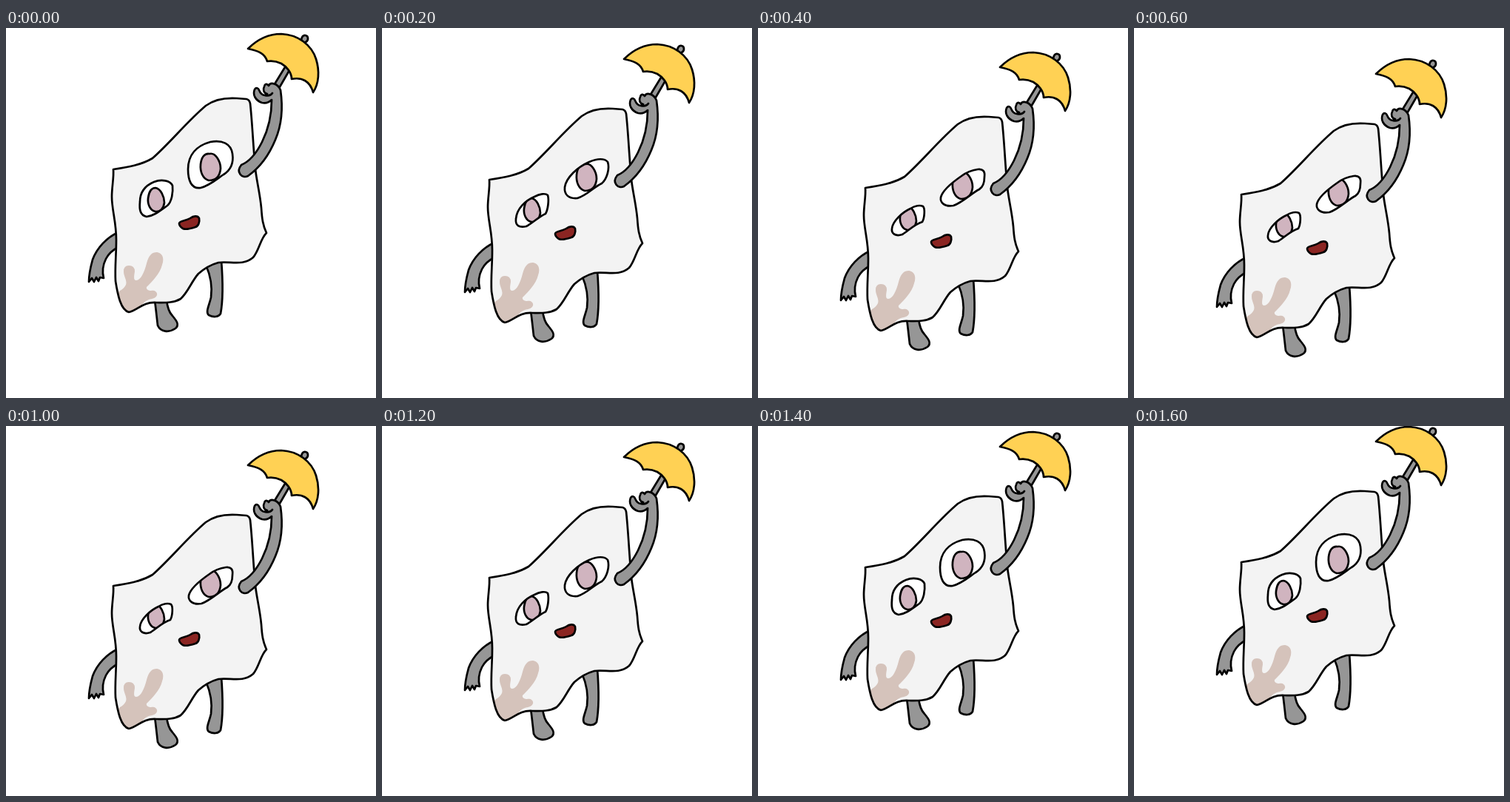
Recreate the animation shown at these times as an HTML page. Size 500 px wide and 500 px high, loop 2 s.

```html
<!DOCTYPE html>
<html lang="en">
<head>
<meta charset="utf-8">
<title>Floating paper with umbrella</title>
<style>
  html, body { margin: 0; width: 100%; height: 100%; overflow: hidden; background: #fff; }
  svg { display: block; width: 100vw; height: 100vh; }
  .line { stroke: #000; stroke-width: 2.7; stroke-linejoin: round; stroke-linecap: round; }
  .limb { fill: #969696; }
  .paper { fill: #f3f3f3; }
  .white { fill: #fff; }
  .pupil { fill: #d0b4bf; }
  .none { fill: none; }

  /* Every pose is held, then switched hard */
  .float, .eyes { animation: 2s step-end infinite; }
  .float { animation-name: float; }
  .open { animation-name: open; }
  .half { animation-name: half; }
  .narrow { animation-name: narrow; }

  @keyframes float {
    0%, 70% { transform: translateY(0); }
    10%, 60% { transform: translateY(14px); }
    20%, 50% { transform: translateY(25px); }
    30% { transform: translateY(34px); }
    80%, 100% { transform: translateY(-7px); }
  }
  @keyframes open {
    0%, 70%, 100% { visibility: visible; }
    10% { visibility: hidden; }
  }
  @keyframes half {
    0%, 20%, 70%, 100% { visibility: hidden; }
    10%, 60% { visibility: visible; }
  }
  @keyframes narrow {
    0%, 60%, 100% { visibility: hidden; }
    20% { visibility: visible; }
  }
</style>
</head>
<body>
<svg viewBox="0 0 500 500">
  <defs>
    <path id="sheet" d="M145 191C165 188 183 185 198 176C222 155 244 127 270 105C282 96 296 94 312 95L325 96Q329 97 330 102C333 130 334 160 337 191C339 208 343 223 345 243C346 258 347 266 352 277C344 284 342 301 334 310C320 322 304 315 287 317C276 320 268 325 260 332C251 342 246 357 236 366C226 372 214 371 203 371C184 370 179 381 166 384C155 381 151 361 148 342C147 322 149 308 149 286C149 262 143 246 143 228C143 215 146 201 145 191Z"/>
    <path id="openR" d="M246 191C246 171 258 159 276 154C292 151 304 156 306 170C308 184 302 193 294 198C285 204 275 213 263 216C250 218 246 205 246 191Z"/>
    <path id="openL" d="M181 235C181 222 188 213 200 208C210 204 222 206 225 213C226 222 224 235 218 240C208 247 200 254 190 255C181 253 180 245 181 235Z"/>
    <path id="halfR" d="M247 201C249 188 264 174 280 167C291 162 301 162 305 167C308 176 304 190 297 196C286 201 277 212 264 216C252 217 246 211 247 201Z"/>
    <path id="halfL" d="M181 244C182 230 194 219 206 214C213 210 221 209 224 212C226 219 224 232 221 237C212 241 203 250 195 254C185 256 180 253 181 244Z"/>
    <path id="narrowR" d="M247 204C249 195 262 184 275 175C283 169 290 167 297 166C304 165 307 169 306 176C306 183 304 190 299 193C289 198 276 211 264 215C252 217 246 211 247 204Z"/>
    <path id="narrowL" d="M181 246C182 236 195 224 206 219C212 215 219 214 223 216C226 219 225 232 222 237C212 240 203 249 195 254C186 257 180 253 181 246Z"/>
    <g id="pupils" class="pupil line">
      <path d="M275 170C283 168 290 180 290 190C289 201 283 206 274 206C266 204 262 194 263 184C264 175 268 169 275 170Z"/>
      <path d="M202 216C209 217 214 228 214 236C213 244 208 249 202 248C195 247 191 238 192 230C193 222 196 216 202 216Z"/>
    </g>
    <clipPath id="inSheet"><use href="#sheet"/></clipPath>
    <clipPath id="inOpen"><use href="#openR"/><use href="#openL"/></clipPath>
    <clipPath id="inHalf"><use href="#halfR"/><use href="#halfL"/></clipPath>
    <clipPath id="inNarrow"><use href="#narrowR"/><use href="#narrowL"/></clipPath>
  </defs>

  <g class="float">
    <!-- far arm and legs -->
    <g class="limb line">
      <path d="M152 276C136 283 123 297 117 313C114 324 112 334 112 343L116 338L119 343L122 337L125 342L127 337L132 338C130 330 131 320 135 312C139 304 144 300 152 296Z"/>
      <path d="M201 368C203 383 204 394 205 402C209 411 220 412 229 406C235 401 230 395 225 389C220 384 218 377 217 367Z"/>
      <path d="M270 320C277 336 279 350 277 364C275 374 269 384 274 388C280 391 287 391 290 386C293 370 293 340 291 314Z"/>
    </g>

    <use href="#sheet" class="paper"/>
    <path clip-path="url(#inSheet)" fill="#d5c3bb" d="M145 362C152 355 159 354 162 347C164 341 159 336 159 329Q159 321 166 321Q174 321 174 329C173 336 172 341 176 341C182 341 187 330 190 318C193 307 197 303 204 303C212 304 214 312 211 320C208 332 198 342 190 350C189 353 193 355 196 355C201 354 205 357 204 361C203 365 197 366 193 367C187 369 184 374 181 378L167 390L145 385Z"/>
    <use href="#sheet" class="none line"/>

    <g class="eyes open">
      <g class="white"><use href="#openR"/><use href="#openL"/></g>
      <use href="#pupils" clip-path="url(#inOpen)"/>
      <g class="none line"><use href="#openR"/><use href="#openL"/></g>
    </g>
    <g class="eyes half">
      <g class="white"><use href="#halfR"/><use href="#halfL"/></g>
      <use href="#pupils" clip-path="url(#inHalf)"/>
      <g class="none line"><use href="#halfR"/><use href="#halfL"/></g>
    </g>
    <g class="eyes narrow">
      <g class="white"><use href="#narrowR"/><use href="#narrowL"/></g>
      <use href="#pupils" clip-path="url(#inNarrow)"/>
      <g class="none line"><use href="#narrowR"/><use href="#narrowL"/></g>
    </g>

    <path class="line" fill="#8b2522" d="M234 264C235 260 243 261 249 257C253 254 259 253 261 257C262 262 260 268 256 269C250 271 243 273 239 271Q234 268 234 264Z"/>

    <!-- umbrella -->
    <path class="limb line" d="M361 79L399 17C399 12 402 9 405 10C409 11 409 17 405 19L368 83Z"/>
    <path class="line" fill="#ffd154" d="M327 28C340 15 355 8 372 8C395 9 413 23 419 42C424 58 423 75 415 87C411 72 400 66 386 69C386 60 379 52 372 48C366 45 359 44 353 45C350 35 342 31 327 28Z"/>

    <!-- raised arm -->
    <path class="limb line" d="M318 185C330 180 339 168 346 154C354 138 359 119 359 97C355 101 351 102 346 101C337 98 333 90 336 83C338 80 341 81 342 84C344 89 346 91 350 91L353 89C348 88 347 83 349 79C350 75 353 75 355 78C357 73 367 74 371 84C374 105 373 130 364 151C355 173 341 190 327 200C319 204 310 195 318 185Z"/>
    <path class="none line" d="M350 91C354 92 358 91 360 88"/>
  </g>
</svg>
</body>
</html>
```
